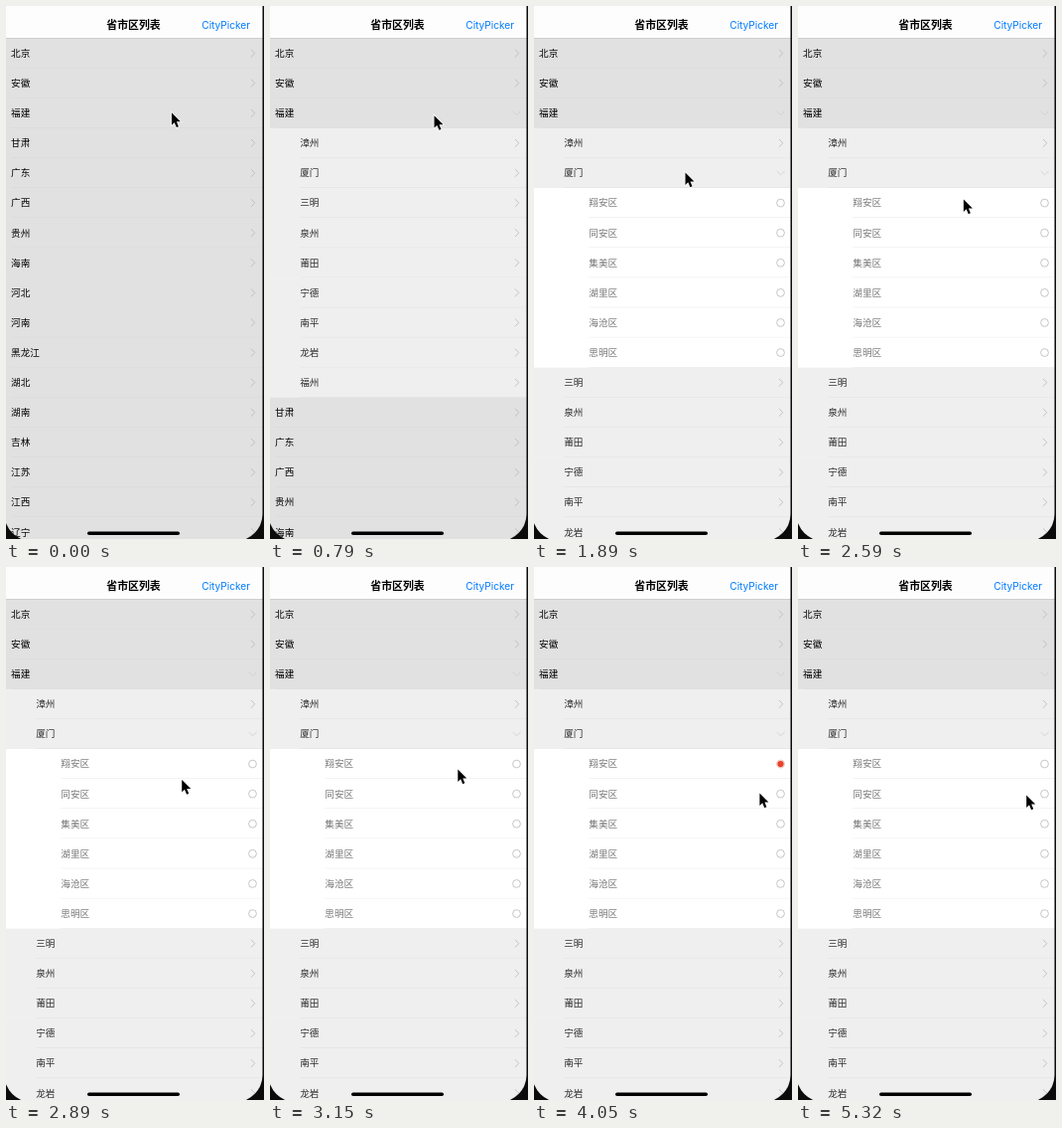
These frames come from a looping animation (260 by 536 pixels, 5380 ms). An HTML page:

```html
<!DOCTYPE html>
<html lang="zh-CN">
<head>
<meta charset="utf-8">
<title>省市区列表</title>
<style>
html, body { margin: 0; width: 100%; height: 100%; overflow: hidden; background: #fff; }
svg { display: block; width: 260px; height: 536px; }
text { font: 9.6px "Noto Sans CJK SC", "Noto Sans CJK", "Noto Sans", sans-serif; }
.title { font-size: 10.9px; font-weight: 600; text-anchor: middle; }
.action { font: 10.1px Inter, "Liberation Sans", sans-serif; fill: #007aff; text-anchor: end; }
.mark { fill: none; stroke: #b8b8b8; stroke-width: .8; }
.open { stroke: #cdcdcd; }
</style>
</head>
<body>
<svg viewBox="0 0 260 536">
  <g id="lists"></g>
  <rect width="260" height="32" fill="#fdfdfd"/>
  <rect y="32" width="260" height=".6" fill="#b8b8b8"/>
  <text class="title" x="128.5" y="22.7">省市区列表</text>
  <text class="action" x="246" y="22.5">CityPicker</text>
  <rect x="82" y="528.4" width="93" height="3.5" rx="1.75"/>
  <path d="M258.5 0V511A27 27 0 0 1 231.5 538H25.5A27 27 0 0 1 -1.5 511V538H260V0Z" fill="#0b0b0b"/>
  <path id="cursor" d="M0 0V12.4L2.8 9.8 4.9 14.7 7 13.8 5 9H9Z" stroke="#fff" stroke-width="1.5" paint-order="stroke"/>
</svg>
<script>
const LOOP = 5380, TOP = 32.5, PITCH = 30.1;
const provinces = "北京 安徽 福建 甘肃 广东 广西 贵州 海南 河北 河南 黑龙江 湖北 湖南 吉林 江苏 江西 辽宁".split(" ");
const cities = "漳州 厦门 三明 泉州 莆田 宁德 南平 龙岩 福州".split(" ");
const districts = "翔安区 同安区 集美区 湖里区 海沧区 思明区".split(" ");
const levels = [
  { bg: "#e1e1e1", ink: "#000", line: "#d9d9d9" },
  { bg: "#efefef", ink: "#2a2a2a", line: "#e2e2e2" },
  { bg: "#fff", ink: "#777", line: "#e6e6e6" }
];

const rows = (names, level) => names.map(name => ({ name, level }));
function expand(list, parent, children, level) {
  const at = list.findIndex(r => r.name === parent);
  return [
    ...list.slice(0, at), { ...list[at], open: true },
    ...rows(children, level), ...list.slice(at + 1)
  ];
}

function marker(row, y) {
  if (row.level === 2)
    return `<circle class="mark" cx="248.5" cy="${y}" r="3.9"/>
      <g class="dot"><circle cx="248.5" cy="${y}" r="4.2" fill="#f5d3cb"/>
      <circle cx="248.5" cy="${y}" r="3.1" fill="#e9432a"/></g>`;
  return row.open
    ? `<path class="mark open" d="M244.7 ${y - 1.9}l3.9 3.9 3.9-3.9"/>`
    : `<path class="mark" d="M246.9 ${y - 3.9}l3.9 3.9-3.9 3.9"/>`;
}

function drawRow(row, i) {
  const s = levels[row.level], x = 5.1 + 25.1 * row.level;
  const y = TOP + i * PITCH, mid = y + PITCH / 2;
  return `<rect y="${y}" width="260" height="${PITCH + .5}" fill="${s.bg}"/>
    <rect x="${x}" y="${y + PITCH - .6}" width="260" height=".7" fill="${s.line}"/>
    <text x="${x}" y="${mid + 3.4}" fill="${s.ink}">${row.name}</text>${marker(row, mid)}`;
}

const closed = rows(provinces, 0);
const withCities = expand(closed, "福建", cities, 1);
const withDistricts = expand(withCities, "厦门", districts, 2);
const holder = document.getElementById("lists");
holder.innerHTML = [closed, withCities, withDistricts]
  .map(list => `<g>${list.slice(0, 17).map(drawRow).join("")}</g>`).join("");
const views = [...holder.children];
const dots = [...holder.querySelectorAll(".dot")];
const cursor = document.getElementById("cursor");

const home = { x: 167, y: 107.3 };
const moves = [
  { from: 0, to: 20, x: 166.2, y: 107.8 },
  { from: 780, to: 1320, x: 149, y: 166.2 },
  { from: 1340, to: 1690, x: 152.5, y: 167.5 },
  { from: 2400, to: 2950, x: 177.5, y: 214.5 },
  { from: 2970, to: 3250, x: 191, y: 202 },
  { from: 3670, to: 4190, x: 230.2, y: 229.5 }
];
const picks = [
  { row: 0, on: 3420, off: 4590 },
  { row: 1, on: 4590, off: 5320 }
];

const clamp = v => Math.min(1, Math.max(0, v));
const easeOut = k => 1 - (1 - k) ** 2;

function pointer(t) {
  return moves.reduce((p, m) => {
    const k = easeOut(clamp((t - m.from) / (m.to - m.from)));
    return { x: p.x + (m.x - p.x) * k, y: p.y + (m.y - p.y) * k };
  }, home);
}

function render(t) {
  const shown = t < 220 ? 0 : t < 1890 ? 1 : 2;
  views.forEach((v, i) => v.style.display = i === shown ? "" : "none");
  dots.forEach((d, i) => {
    const picked = picks.some(p => p.row === i && t >= p.on && t < p.off);
    d.style.display = picked ? "" : "none";
  });
  const { x, y } = pointer(t);
  cursor.setAttribute("transform", `translate(${x} ${y})`);
}

const start = performance.now();
function tick() {
  render((performance.now() - start) % LOOP);
  requestAnimationFrame(tick);
}
tick();
</script>
</body>
</html>
```
